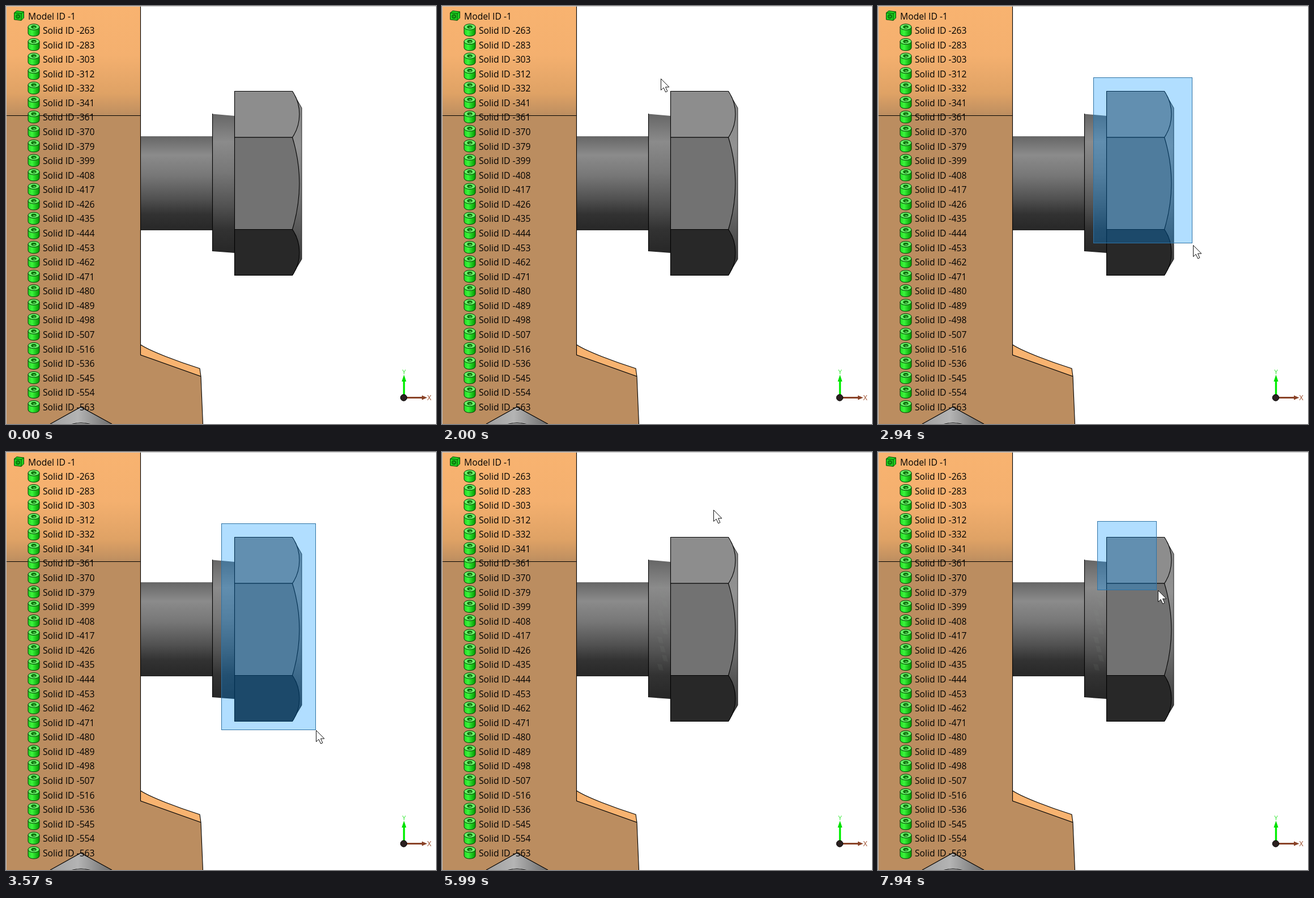
Write an HTML page that moves like this. It is 759 px wide and 738 px high and loops after 8 s.

```html
<!DOCTYPE html>
<html lang="en">
<head>
<meta charset="utf-8">
<title>Box selection of a bolt head</title>
<style>
  html, body { margin: 0; width: 100%; height: 100%; overflow: hidden; background: #fff; }
  svg { display: block; }
  text { font-family: "Open Sans", "Noto Sans", sans-serif; font-size: 15.7px; fill: #000; }
  .edge { fill: none; stroke: #000; stroke-width: 1.1; }
  .lit { fill: none; stroke: #0f0; stroke-width: 2.4; }
</style>
</head>
<body>
<svg width="759" height="738" viewBox="0 0 759 738">
  <defs>
    <linearGradient id="block" x2="0" y2="1">
      <stop offset="0" stop-color="#f8b370"/><stop offset=".45" stop-color="#f4b06f"/>
      <stop offset=".8" stop-color="#dfa265"/><stop offset="1" stop-color="#bd8e60"/>
    </linearGradient>
    <linearGradient id="round" x2="0" y2="1">
      <stop offset="0" stop-color="#666"/><stop offset=".2" stop-color="#8b8b8b"/>
      <stop offset=".42" stop-color="#777"/><stop offset=".66" stop-color="#525252"/>
      <stop offset=".83" stop-color="#323232"/><stop offset="1" stop-color="#272727"/>
    </linearGradient>
    <linearGradient id="chamfer" x2="0" y2="1">
      <stop offset="0" stop-color="#858585"/><stop offset=".3" stop-color="#929292"/>
      <stop offset=".6" stop-color="#707070"/><stop offset="1" stop-color="#303030"/>
    </linearGradient>
    <linearGradient id="litChamfer" x2="0" y2="1">
      <stop offset=".5" stop-color="#0f0"/><stop offset=".72" stop-color="#00a000"/>
      <stop offset="1" stop-color="#003200"/>
    </linearGradient>
    <linearGradient id="peak">
      <stop offset="0" stop-color="#a0a0a0"/><stop offset=".45" stop-color="#b4b4b4"/>
      <stop offset="1" stop-color="#6c6c6c"/>
    </linearGradient>
    <linearGradient id="barrel">
      <stop offset="0" stop-color="#22d822"/><stop offset=".35" stop-color="#3cf53c"/>
      <stop offset="1" stop-color="#009600"/>
    </linearGradient>
    <g id="solid">
      <path d="M-10-6V5C-10 12 10 12 10 5V-6" fill="url(#barrel)" stroke="#043a04"/>
      <ellipse cy="-6" rx="10" ry="5.2" fill="#66f566" stroke="#043a04"/>
      <ellipse cy="-6" rx="4.2" ry="2.2" fill="#0a8a0a" stroke="#043a04"/>
      <path d="M-1-5H3" stroke="#7dff7d"/>
    </g>
    <path id="topFace" d="M403.5 150.5H505.5C522 174 522 208 505.5 232H403.5Z"/>
    <path id="midFace" d="M403.5 232H505.5C522 286 522 340 505.5 394.5H403.5Z"/>
    <path id="lowFace" d="M403.5 394.5H505.5C522 418 522 452 505.5 475.5H403.5Z"/>
    <path id="cone" d="M505 150.5L522 180V447L505 475.5Z"/>
  </defs>

  <!-- housing -->
  <rect width="237.5" height="738" fill="#bb8d60"/>
  <rect width="237.5" height="193" fill="url(#block)"/>
  <path d="M237.5 598C256 610 304 628 342 640L344 654L237.5 616Z" fill="#f8b370"/>
  <path d="M237 616L344 654L347.5 738H237Z" fill="#bb8d60"/>
  <path class="edge" d="M0 193.5H237.5M237.5 0V616L344 654L347.5 738M237.5 598C256 610 304 628 342 640L344 654"/>
  <path d="M78 738L132 708L187 738Z" fill="url(#peak)"/>
  <path class="edge" d="M78 738L132 708L187 738M116 738.5Q132 733.5 149 738.5"/>

  <!-- bolt -->
  <rect x="238" y="230" width="126" height="166" fill="url(#round)"/>
  <path d="M364 190.5L404 194V436L364 433Z" fill="url(#round)"/>
  <path class="edge" d="M364.5 190V433"/>
  <g id="facets" fill="#8fa08f" fill-opacity=".09"></g>
  <g stroke="#000" stroke-width="1.1" stroke-linejoin="round">
    <use href="#cone" fill="url(#chamfer)" stroke-width=".8"/>
    <use href="#topFace" fill="#8d8d8d"/>
    <use href="#midFace" fill="#727272"/>
    <use href="#lowFace" fill="#282828"/>
  </g>

  <g id="highlight">
    <use href="#cone" fill="url(#litChamfer)"/>
    <use href="#topFace" fill="#0f0"/>
    <use href="#midFace" fill="#00c800"/>
    <use href="#lowFace" fill="#003200"/>
    <path class="lit" d="M505 475.5H403.5V150.5H505L522 180V447M396.5 231V396M403.5 232H505.5C522 286 522 340 505.5 394.5H403.5M505.5 394.5C522 418 522 452 505.5 475.5"/>
    <g id="vertices" fill="#00d800" stroke="#002800" stroke-width="1.2">
      <path d="M403 302.5a3.7 3.7 0 0 0 0 7M403 331.5a3.7 3.7 0 0 0 0 7" fill="none"/>
    </g>
  </g>

  <!-- model tree -->
  <g id="tree">
    <g stroke="#064d06" stroke-linejoin="round">
      <path d="M14.5 12L19 8.5L31.500 10V21L27 25.5L14.5 24Z" fill="#1fd01f"/>
      <path d="M14.5 12L27 13.5L31.500 10M27 13.5V25.5" fill="none"/>
      <circle cx="21" cy="18.5" r="3.5" fill="#0fae0f"/>
      <circle cx="21.5" cy="18.5" r="1.3" fill="#6f6"/>
    </g>
    <text x="39" y="23.5">Model ID -1</text>
  </g>

  <!-- axes -->
  <path d="M702.5 690V660" stroke="#00f000" stroke-width="3.4"/>
  <path d="M702.5 651L706.500 663H698.5Z" fill="#00e000"/>
  <path d="M704 691.5H736" stroke="#8a4328" stroke-width="3"/>
  <path d="M743.5 691.5L734 687.5V695.5Z" fill="#8a4328"/>
  <circle cx="702" cy="691.5" r="5.7" fill="#2b2020" stroke="#000"/>
  <text x="702.5" y="650" text-anchor="middle" style="font-size:11px;fill:#2be82b">Y</text>
  <text x="747" y="696" text-anchor="middle" style="font-size:12.5px;fill:#9a4a28">X</text>

  <path d="M0 .5H759M.5 0V738" stroke="#c4c4c4"/>
  <rect id="box" fill="rgb(0,146,255)" fill-opacity=".305" stroke="#2f73a5"/>
  <path id="cursor" d="M0 0V20L4.6 15.8L8.2 23.5L11.4 22L8 14.6H14.4Z" fill="#fff" stroke="#111" stroke-linejoin="round"/>
</svg>
<script>
const LOOP = 8000, UPDATE = 78.15, PHASE = 46.25, BOX_LAG = 18;
const $ = id => document.getElementById(id);

function set(node, attrs) {
  for (const name in attrs) node.setAttribute(name, attrs[name]);
  return node;
}

function add(parent, tag, attrs, text = "") {
  const node = document.createElementNS("http://www.w3.org/2000/svg", tag);
  node.textContent = text;
  parent.append(set(node, attrs));
}

// Solid IDs grow by 9, or by 20 after the listed rows
const wideGaps = [0, 1, 3, 5, 8, 22];
for (let row = 0, id = 263; row < 27; row++) {
  const y = 43.5 + row * 25.57;
  add($("tree"), "use", { href: "#solid", x: 49, y: y - .5 });
  add($("tree"), "text", { x: 65, y: y + 5.5 }, "Solid ID -" + id);
  id += wideGaps.includes(row) ? 20 : 9;
}

const addVertex = (cx, cy) => add($("vertices"), "circle", { cx, cy, r: 3.6 });
for (const y of [150.5, 232, 394.5, 476]) {
  addVertex(403.5, y);
  addVertex(505, y);
}
addVertex(522, 179.5);
addVertex(397, 313);
addVertex(403.5, 313);

// Faint tessellation left on the collar after the first selection
for (let i = 0; i < 10; i++)
  add($("facets"), "path", { d: `M${380 + i % 3 * 4} ${230 + i * 16}l8 1 3 11 -8 -1Z` });

// Pointer strokes: quadratic curves, each starting where the last one ended
const entry = [666, 712];
const strokes = [
  { from: 200, until: 1000, via: [520, 40], to: [432, 82] },
  { from: 1000, until: 1460, via: [415, 115], to: [381, 127] },
  { from: 1930, until: 2000, via: [384, 127], to: [386, 128] },
  { from: 2000, until: 2780, via: [490, 321], to: [550, 397] },
  { from: 2780, until: 3540, via: [568, 460], to: [547, 491] },
  { from: 3880, until: 4800, via: [685, 400], to: [490, 100] },
  { from: 5930, until: 6460, via: [440, 111], to: [389, 122.5] },
  { from: 7000, until: 7940, via: [429, 221], to: [494.5, 244.5] }
];

const drags = [
  { from: 2060, until: 3940, left: 380.5, top: 126.5 },
  { from: 7020, until: LOOP, left: 387.5, top: 122.5 }
];

function pointerAt(t) {
  let pos = entry;
  for (const { from, until, via, to } of strokes) {
    if (t < from) break;
    const u = Math.min(1, (t - from) / (until - from)), v = 1 - u;
    pos = pos.map((p, i) => v * v * p + 2 * u * v * via[i] + u * u * to[i]);
  }
  return pos.map(Math.round);
}

const within = (t, span) => t >= span.from && t < span.until;
const show = (id, visible) => $(id).setAttribute("visibility", visible ? "visible" : "hidden");

function draw(t) {
  // The pointer is only sampled at a fixed rate
  const time = Math.floor((t - PHASE) / UPDATE) * UPDATE + PHASE + .5;
  const [x, y] = pointerAt(time);
  set($("cursor"), { transform: `translate(${x + .5} ${y + .5})` });
  show("cursor", time >= 200);
  show("highlight", t >= 3940 && t < 5750);
  show("facets", t >= 3940);

  const drag = drags.find(d => within(t, d));
  show("box", drag);
  if (drag) {
    const [right, bottom] = pointerAt(time - BOX_LAG);
    set($("box"), {
      x: drag.left, y: drag.top,
      width: Math.max(0, right - .5 - drag.left),
      height: Math.max(0, bottom - .5 - drag.top)
    });
  }
}

const start = performance.now();
function tick() {
  draw((performance.now() - start) % LOOP);
  requestAnimationFrame(tick);
}
tick();
</script>
</body>
</html>
```
